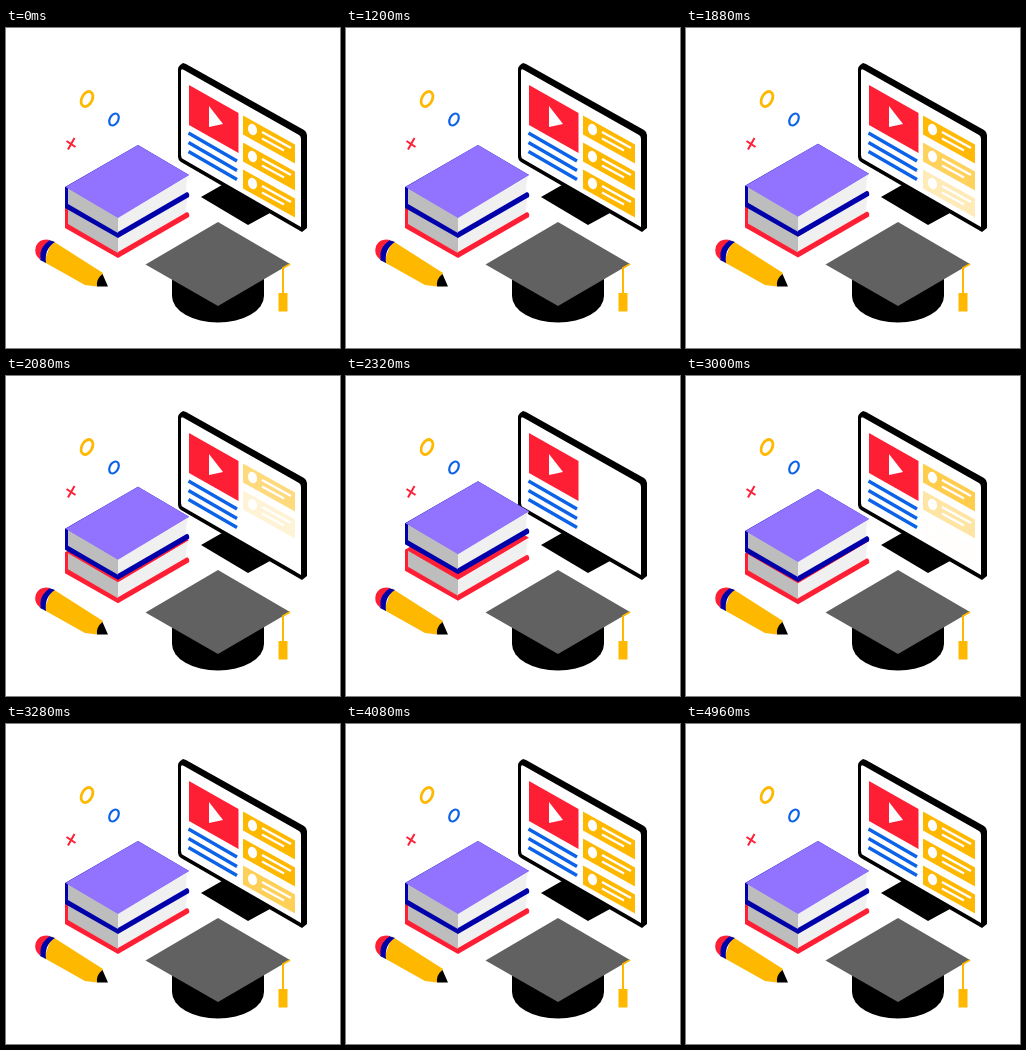
These frames come from a looping animation (334x320 px, 5000 ms). An HTML page:

```html
<!DOCTYPE html>
<html lang="en">
<head>
<meta charset="utf-8">
<title>Online learning</title>
<style>
  html, body { margin: 0; width: 100%; height: 100%; overflow: hidden; background: #fff; }
  svg { display: block; width: 100vw; height: 100vh; }
</style>
</head>
<body>
<svg viewBox="0 0 334 320">
  <defs>
    <g id="book">
      <path fill="currentColor" d="M59 159 132 117 183 147 112 190V210L59 180Z"/>
      <path fill="#bdbdbd" d="M62 160 112 189V205L62 176Z"/>
      <path fill="#f0f0f0" d="M112 189 183 147Q180 151 180 166L112 205Z"/>
      <path fill="currentColor" d="M112 204 181 164Q184 165 183 169L112 210Z"/>
    </g>
    <g id="card">
      <path fill="#ffb800" d="M237 87.500 289 116.500V135.500L237 106.500Z"/>
      <ellipse cx="246.5" cy="101.500" rx="4.4" ry="5.8" fill="#fff" transform="rotate(-20 246.5 101.500)"/>
      <g fill="none" stroke="#fff">
        <path stroke-width="2.2" d="M256 104 285 120"/>
        <path stroke-width="2" d="M256 110.500 278 122.500"/>
      </g>
    </g>
  </defs>

  <g fill="none">
    <ellipse cx="81" cy="71" rx="5.2" ry="8" stroke="#ffb800" stroke-width="2.8" transform="rotate(28 81 71)"/>
    <ellipse cx="108" cy="91.5" rx="4.2" ry="6.4" stroke="#0d63e8" stroke-width="2.2" transform="rotate(28 108 91.5)"/>
    <path stroke="#ff1f35" stroke-width="2" d="M60.5 113 69.500 119M68.500 110 62 121.500"/>
  </g>

  <g id="monitor">
    <path d="M195 169 216 157 264 185 242 197Z"/>
    <path d="M172 41Q172 38 177 35L180 36 298 102Q301 104 301 107V200L296 204 175 134Q172 132 172 129Z"/>
    <path fill="#fff" d="M175 43Q175 40 178 42L293 107Q295 108 295 111V199L177 131Q175 130 175 127Z"/>
    <path fill="#ff1f35" d="M183 57 232.500 85V125L183 97Z"/>
    <path fill="#fff" d="M203 78 217 96 203 99Z"/>
    <path fill="none" stroke="#0d63e8" stroke-width="3.4" d="M182.500 105 231 133M182.500 114.500 231 142.500M182.500 123.500 231 151.500"/>
    <use class="card" href="#card"/>
    <use class="card" href="#card" y="27"/>
    <use class="card" href="#card" y="54"/>
  </g>

  <g id="lower" color="#ff1f35"><use href="#book" y="20"/></g>
  <g id="upper" color="#0000aa">
    <use href="#book"/>
    <path fill="#9173ff" d="M59.500 159 132 117 183 147 112 190Z"/>
  </g>

  <g id="pencil">
    <path fill="#ffb800" d="M46 212.500 97 245 91 258.500 79 257 38 234Z"/>
    <path d="M96.500 246 102 258.500H91Q90 251 96.500 246Z"/>
    <path fill="#0000aa" d="M43 212 49 214Q38 221 40 235L34 232Q30 219 43 212Z"/>
    <path fill="#ff1f35" d="M44 212Q34 210 30 218 27 227 35 232 32 220 44 212Z"/>
  </g>

  <g id="cap">
    <path d="M166 240V268A46 26.500 0 0 0 258 268V240Z"/>
    <path fill="#616161" d="M212 194 284 236 212 278 139.500 236.500Z"/>
    <path fill="none" stroke="#ffb800" stroke-width="2" d="M284 236 277 240V267"/>
    <path fill="#ffb800" d="M272.500 265H281.500V283.500H272.500Z"/>
  </g>
</svg>
<script>
  const LOOP = 5000, MIDDLE = 2500;
  const cards = document.querySelectorAll('.card');
  const upper = document.getElementById('upper');
  const lower = document.getElementById('lower');

  const clamp = x => Math.min(1, Math.max(0, x));
  const ease = x => (1 - Math.cos(Math.PI * clamp(x))) / 2;
  const shift = (el, y) => el.setAttribute('transform', `translate(0 ${y})`);

  function draw(now) {
    // Everything plays forward, then mirrors around the middle of the loop.
    const away = Math.abs(now % LOOP - MIDDLE);
    const lift = ease((750 - away) / 650);
    shift(upper, -12.2 * lift);
    shift(lower, -5.5 * lift);
    cards.forEach((card, i) => card.setAttribute('opacity', clamp((away - 200 - 150 * i) / 430)));
    requestAnimationFrame(draw);
  }
  draw(performance.now());
</script>
</body>
</html>
```
